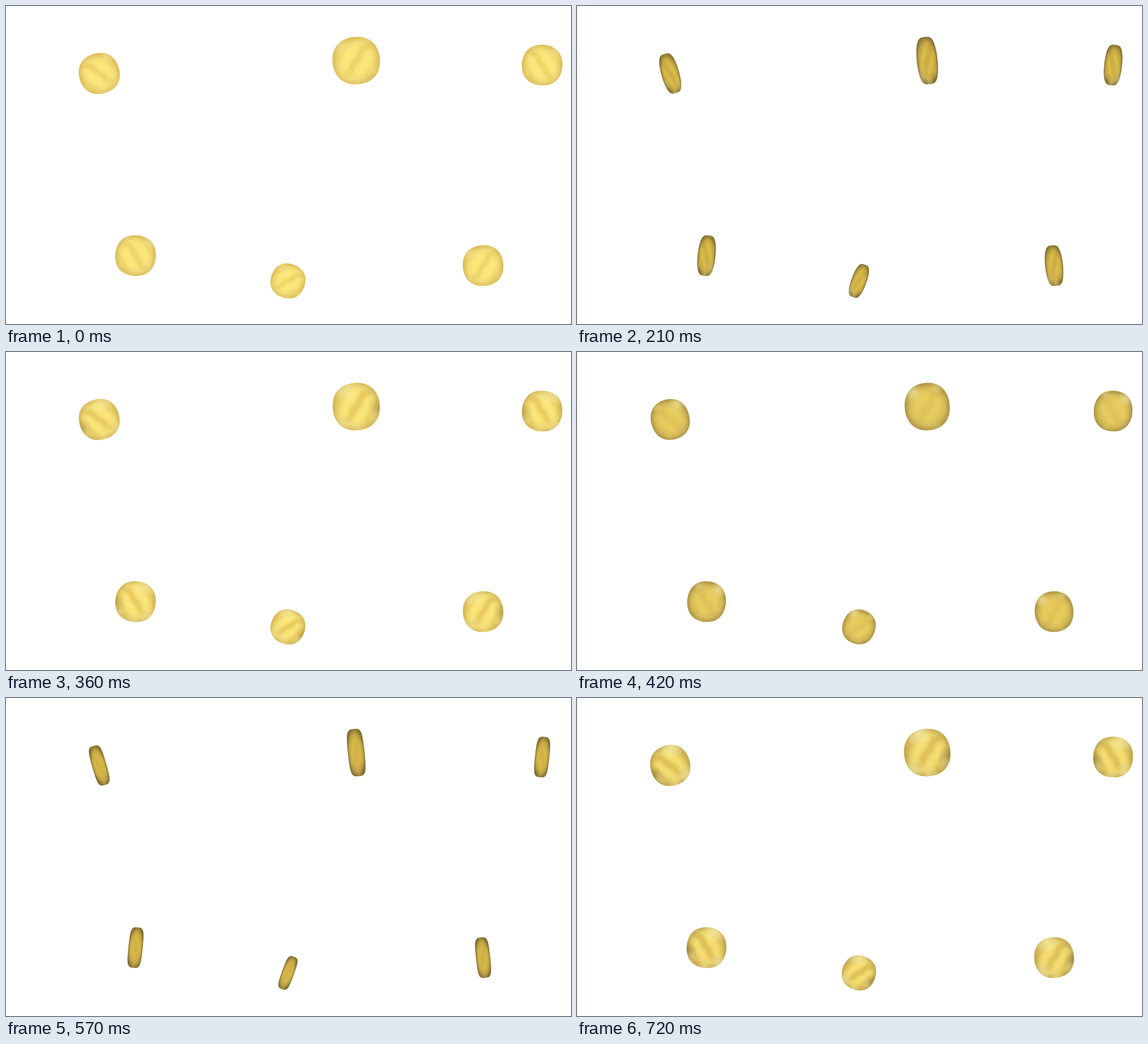
An HTML page with a canvas that plays this animation: 998 px wide and 561 px high, repeating every 750 ms.

```html
<!DOCTYPE html>
<html lang="en">
<head>
<meta charset="utf-8">
<title>Spinning coins</title>
<style>
  html, body { margin: 0; width: 100%; height: 100%; overflow: hidden; background: #fff; }
  canvas { display: block; }
</style>
</head>
<body>
<canvas id="stage" width="998" height="561"></canvas>
<script>
const ctx = document.getElementById('stage').getContext('2d');
const LOOP = 750, STEP = 30, TAU = Math.PI * 2;
const RIM = 0.31; // radius of the rounded edge, relative to the coin

// x, y, radius, tilt in degrees, mirrored (-1) or not (1)
const coins = [
  [164.7, 119, 35.8, -16, -1],
  [618.6, 96.3, 41.8, -6, 1],
  [947, 104.2, 35.8, 6, -1],
  [228.8, 440.4, 35.8, 6, -1],
  [498, 485, 30.4, 20, 1],
  [842.7, 458, 35.8, -6, 1]
];

const rgb = (color, alpha = 1) => `rgba(${color.map(Math.round)},${alpha})`;
const mix = (a, b, k) => a.map((v, i) => v + (b[i] - v) * k);

// A slightly squarish disc with a rounded rim, turned around its upright axis.
function outline(turn) {
  const core = 1 - RIM;
  ctx.beginPath();
  for (let i = 0; i < 120; i++) {
    const a = i / 120 * TAU, cx = Math.cos(a), sy = Math.sin(a);
    const len = Math.hypot(turn * cx, sy) || 1;
    const bulge = 1 + 0.035 * Math.sin(2 * a) ** 2;
    ctx.lineTo(bulge * (core * turn * turn * cx / len + RIM * cx), bulge * (core * sy / len + RIM * sy));
  }
  ctx.closePath();
}

function glow(x, y, r, color, alpha) {
  if (alpha <= 0) return;
  alpha = Math.min(1, alpha);
  const g = ctx.createRadialGradient(x, y, 0, x, y, r);
  g.addColorStop(0, rgb(color, alpha));
  g.addColorStop(0.4, rgb(color, alpha * 0.65));
  g.addColorStop(1, rgb(color, 0));
  ctx.fillStyle = g;
  ctx.fillRect(x - r, y - r, 2 * r, 2 * r);
}

// A wavy diagonal stripe across the face.
function band(shift, half, width, color, alpha) {
  ctx.save();
  ctx.translate(shift, shift * 0.6);
  ctx.scale(half, half);
  ctx.beginPath();
  ctx.moveTo(-0.7, 0.75);
  ctx.bezierCurveTo(-0.2, 0.6, -0.3, 0.15, 0, 0);
  ctx.bezierCurveTo(0.3, -0.15, 0.2, -0.6, 0.7, -0.75);
  ctx.lineCap = 'round';
  ctx.lineWidth = width / half;
  ctx.strokeStyle = rgb(color, alpha);
  ctx.stroke();
  ctx.restore();
}

function streak(x, y, rx, ry, color, alpha) {
  ctx.beginPath();
  ctx.ellipse(x, y, rx, ry, 0.45, 0, TAU);
  ctx.fillStyle = rgb(color, alpha);
  ctx.fill();
}

function drawCoin([x, y, radius, tilt, side], angle) {
  const turn = Math.abs(Math.cos(angle));
  const shine = turn ** 12;
  const swing = Math.sin(2 * angle);
  const opening = Math.max(0, -swing), closing = Math.max(0, swing);
  const glance = opening * shine;
  const body = mix([211, 180, 70], [250, 228, 120], shine);
  const dark = mix([196, 162, 68], [233, 203, 94], shine);
  const light = mix([230, 200, 84], [254, 234, 130], shine);
  const edge = mix([122, 104, 54], [212, 180, 86], shine);
  const cream = [250, 240, 168], shadow = [104, 88, 46];

  ctx.save();
  ctx.translate(x, y);
  ctx.rotate(tilt * Math.PI / 180);
  ctx.scale(side * radius, radius);
  outline(turn);
  ctx.fillStyle = rgb(body);
  ctx.fill();
  ctx.clip();
  ctx.scale((1 - RIM) * turn + RIM, 1);

  // face relief
  const relief = Math.min(1, opening + shine * 0.6);
  for (const s of [-1, 1]) {
    band(0.66 * s, 0.7, 0.26, dark, relief * 0.7);
    band(0.33 * s, 0.72, 0.24, light, relief * 0.85);
  }
  band(0, 0.75, 0.34, dark, relief * 0.45);
  band(0, 0.75, 0.22, dark, relief * 0.75);
  const flash = closing * (1 - shine) * (angle < Math.PI ? 1 : 0.3);
  streak(-0.02, -0.12, 0.2, 0.3, light, flash);
  streak(0.2, 0.55, 0.12, 0.1, light, flash);

  // darker rim
  const rim = ctx.createRadialGradient(0, 0, 0.55, 0, 0, 1.04);
  rim.addColorStop(0, rgb(edge, 0));
  rim.addColorStop(0.5, rgb(edge, 0.28));
  rim.addColorStop(1, rgb(edge, 0.9));
  ctx.fillStyle = rim;
  ctx.fillRect(-1.2, -1.2, 2.4, 2.4);
  glow(0.95, 0.85 - 0.75 * shine, 0.55, shadow, opening * 0.9);

  // light travelling along the rim
  const top = closing * 0.7 + shine * 0.4;
  const bottom = opening + shine * 0.25;
  glow(-0.25, -0.85, 0.6, cream, glance * 2.4);
  glow(-0.58, -0.68, 0.45, cream, top);
  glow(0.5, -0.78, 0.32, cream, top * 0.6);
  glow(0.35, 0.88, 0.3, cream, top * 0.3);
  glow(-0.65, 0.66, 0.5, cream, bottom);
  glow(0.02, 0.98, 0.38, cream, bottom * 0.8);
  glow(0.72, 0.5, 0.34, cream, bottom * 0.6);

  ctx.lineWidth = 0.02;
  ctx.strokeStyle = rgb(light, 0.3);
  for (const r of [0.72, 0.8]) {
    ctx.beginPath();
    ctx.arc(0, 0, r, 0, TAU);
    ctx.stroke();
  }
  ctx.restore();
}

function frame() {
  const time = Math.floor(performance.now() % LOOP / STEP) * STEP;
  ctx.clearRect(0, 0, 998, 561);
  for (const coin of coins) drawCoin(coin, time / LOOP * TAU);
  requestAnimationFrame(frame);
}
frame();
</script>
</body>
</html>
```
